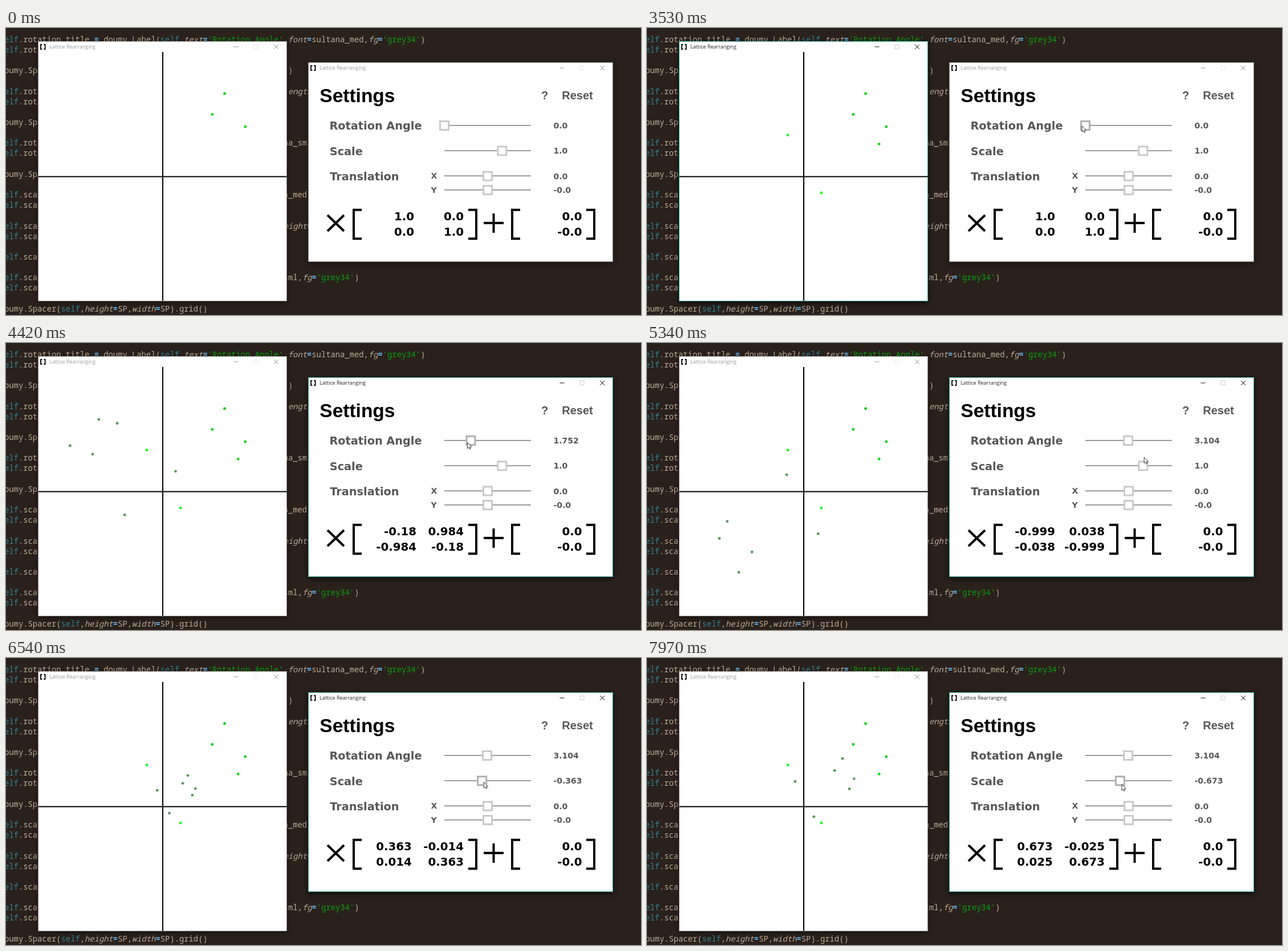
These frames come from a looping animation (1114x503 px, 8 s). An HTML page:

```html
<!DOCTYPE html>
<html lang="en">
<head>
<meta charset="utf-8">
<title>Lattice Rearranging</title>
<style>
  html, body { margin: 0; width: 100%; height: 100%; overflow: hidden; background: #2a211c; }
  svg { display: block; width: 100vw; height: 100vh; }
  text { white-space: pre; }
  .code { font: 13.83px "Noto Sans Mono", monospace; fill: #bdab98; }
  .self { fill: #2f8493; }
  .str { fill: #0a9f0c; }
  .arg { font-style: italic; }
  .op { fill: #5fb8f5; font-weight: bold; }
  .title { font: 9px "Open Sans", sans-serif; fill: #999; }
  .btn { stroke: #999; fill: none; }
  .max { stroke: #ececec; fill: none; }
  .frame { fill: #fff; stroke: #8d8985; stroke-width: .6; }
  .shade { fill: #000; opacity: .4; }
  .on .title { fill: #222; }
  .on .btn { stroke: #111; }
  .on .max { stroke: #ccc; }
  .on .frame { stroke: #2fa797; stroke-width: 1; }
  .on .shade { opacity: .65; }
  .grey { fill: #575757; }
  .head { font: bold 33.5px "Liberation Sans", Arial, sans-serif; }
  .link { font: bold 20px "Liberation Sans", Arial, sans-serif; }
  .label { font: bold 19.3px "DejaVu Sans", Verdana, sans-serif; }
  .small { font: bold 14px "DejaVu Sans", Verdana, sans-serif; }
  .cell { font: bold 19.8px "DejaVu Sans", Verdana, sans-serif; text-anchor: end; }
  .handle { fill: #fff; stroke: #cacaca; stroke-width: 3; }
  .handle.hot { stroke: #b0b0b0; }
</style>
</head>
<body>
<svg id="stage" viewBox="0 0 1114 503" preserveAspectRatio="none"></svg>
<script>
const LOOP = 8000;
const OX = 275, OY = 260.5;
const LEAD = 60; // ms by which dragged parts run ahead of the printed values
const $ = id => document.getElementById(id);

// ---------- editor behind the windows ----------
const ROT = 'elf.rotation', SCL = 'elf.scale_x', GAP = 'oumy.Spacer';
const CODE = [
  [0, 0, "elf.rotation_title = doumy.Label(self.text='Rotation Angle',font=sultana_med,fg='grey34')"],
  [1, 0, ROT], [3, 0, GAP], [3, 60, ')'],
  [5, 0, ROT], [5, 60, 'ength=1'], [6, 0, ROT], [8, 0, GAP],
  [10, 0, ROT], [10, 59, 'na_sml'], [11, 0, ROT], [13, 0, GAP],
  [15, 0, SCL], [15, 59, 'a_med,'], [16, 0, SCL],
  [18, 0, SCL], [18, 59, 'eight='], [19, 0, SCL], [21, 0, SCL],
  [23, 0, SCL], [23, 59, "sml,fg='grey34')"], [24, 0, SCL],
  [26, 0, 'oumy.Spacer(self,height=SP,width=SP).grid()']
];

function paint(line) {
  const rx = /('[^']*')|\b(s?elf)\b|(\w+(?==))|(=)|(\w+|[^\w'=]+)/g;
  return line.replace(rx, (m, str, self, arg, op) => {
    const cls = str ? 'str' : self ? 'self' : arg ? 'arg' : op ? 'op' : '';
    return cls ? `<tspan class="${cls}">${m}</tspan>` : m;
  });
}

const codeText = CODE.map(([row, col, s]) =>
  `<text class="code" x="${-3 + col * 8.3}" y="${24.8 + row * 18.15}">${paint(s)}</text>`).join('');

// ---------- windows ----------
function windowBox(id, x, y, w, h, body) {
  const r = x + w, m = y + 9.5;
  return `<g id="${id}">
    <rect class="shade" x="${x - 1}" y="${y + 2}" width="${w + 2}" height="${h + 2}" filter="url(#blur)"/>
    <rect class="frame" x="${x}" y="${y}" width="${w}" height="${h}"/>
    <path d="M${x + 6.8} ${m - 4}h-2.3v8h2.3M${x + 9.8} ${m - 4}h2.3v8h-2.3" fill="none" stroke="#000" stroke-width="1.8"/>
    <text class="title" x="${x + 19.5}" y="${m + 3.4}">Lattice Rearranging</text>
    <path class="btn" d="M${r - 93} ${m}h8M${r - 22.5} ${m - 4}l8 8m0 -8l-8 8"/>
    <rect class="max" x="${r - 57.5}" y="${m - 3.5}" width="7" height="7"/>
    ${body}</g>`;
}

const txt = (cls, x, y, s, id = '') => `<text class="${cls}" x="${x}" y="${y}" id="${id}">${s}</text>`;

const slider = (id, x, y) =>
  `<path d="M769 ${y - .3}H921" stroke="#7c7c7c" stroke-width="1.5"/>
   <rect class="handle" id="${id}" x="${x - 7.5}" y="${y - 7.5}" width="15" height="15"/>`;

const DOTS = [
  // x, y, time of appearance, colour
  [383.5, 115, 0, '#08cc0e'], [361.8, 151.4, 0, '#0acf10'], [419.8, 173, 0, '#0dd312'],
  [407.2, 203.4, 1180, '#12dc16'], [247, 187.6, 1920, '#20f422'], [306, 289, 2560, '#24fa26']
];
const dot = (id, x, y, fill) => `<circle id="${id}" cx="${x}" cy="${y}" r="2.4" fill="${fill}"/>`;

const graph = `<path d="M275 42V478M57 260.5H492.5" stroke="#000" stroke-width="2"/>` +
  DOTS.map((d, i) => dot('moved' + i, d[0], d[1], '#5a955c')).join('') +
  DOTS.map((d, i) => dot('fixed' + i, d[0], d[1], d[3])).join('');

const settings =
  txt('head', 550.3, 130, 'Settings') +
  txt('link grey', 939, 125, '?') + txt('link grey', 975.3, 125, 'Reset') +
  txt('label grey', 567.5, 178.4, 'Rotation Angle') +
  txt('label grey', 567.8, 222.5, 'Scale') +
  txt('label grey', 568.3, 266.8, 'Translation') +
  txt('small grey', 745.5, 264.4, 'X') + txt('small grey', 745.5, 288.8, 'Y') +
  slider('rotHandle', 769, 171) + slider('sclHandle', 870, 215.3) +
  slider('xHandle', 845, 259.5) + slider('yHandle', 845, 284) +
  txt('small grey', 960.5, 176.2, '0.0', 'rotValue') +
  txt('small grey', 960.5, 220.4, '1.0', 'sclValue') +
  txt('small grey', 960.5, 264.6, '0.0') + txt('small grey', 960.5, 288.8, '-0.0') +
  `<g fill="none" stroke="#000" stroke-width="4">
    <path d="M564 328l29 28m0 -28l-29 28M838 341.7h35M855.5 325v34"/>
    <path d="M624 318.8H610V369.2H624M902 318.8H888V369.2H902M811 318.8H825V369.2H811M1018 318.8H1032V369.2H1018"/>
  </g>` +
  ['m00', 'm01', 'm10', 'm11'].map((id, i) =>
    txt('cell', i % 2 ? 803 : 716, i < 2 ? 337.3 : 363.8, '', id)).join('') +
  txt('cell', 1010.5, 337.3, '0.0') + txt('cell', 1010.5, 363.8, '-0.0');

$('stage').innerHTML =
  `<defs><filter id="blur" x="-10%" y="-10%" width="120%" height="120%"><feGaussianBlur stdDeviation="5"/></filter></defs>
   <rect width="1114" height="503" fill="#2a211c"/>` + codeText +
  windowBox('graphWin', 56.5, 23.5, 436, 455, graph) +
  windowBox('setWin', 530.5, 60.5, 534, 349, settings) +
  `<path id="cursor" d="M0 0V10.4L2.4 8.2L4 11.8L5.7 11L4.2 7.6H7.4Z" stroke-width=".9"/>`;

// ---------- motion ----------
const ROT_KEYS = [[3710, 0], [3900, .25], [4420, 1.752], [4440, 1.752], [4500, 2], [4550, 2.03],
  [4800, 2.9], [4910, 3.104]];
const SCL_KEYS = [[5800, 1], [5940, .85], [6420, -.3], [6540, -.363], [6560, -.363], [6600, -.385],
  [6830, -.75], [7220, -1.38], [7370, -1.46], [7560, -1.46], [7660, -1.33], [7870, -.8],
  [7970, -.673], [7985, -.673], [8030, -.597]];
const PATH = [[280, 903, 474], [950, 408, 202], [1180, 408, 202], [1590, 247, 187.4], [1920, 247, 187.4],
  [2280, 306, 288], [2710, 306, 288], [3350, 762, 172.5], [3480, 762, 172.5], [3530, 763, 171.5], [3710, 763, 171.5],
  [4420, 810, 174.5], [4910, 838, 174.5], [5160, 838, 174.5], [5360, 873, 201], [5570, 873, 211],
  [5750, 873, 211], [6540, 838, 217.5], [7330, 811, 221], [7970, 832, 221.5]];

const linear = u => u;
const smooth = u => u * u * (3 - 2 * u);

function track(keys, t, k = 1, ease = linear) {
  if (t <= keys[0][0]) return keys[0][k];
  for (let i = 1; i < keys.length; i++) {
    const a = keys[i - 1], b = keys[i];
    if (t < b[0]) return a[k] + (b[k] - a[k]) * ease((t - a[0]) / (b[0] - a[0]));
  }
  return keys[keys.length - 1][k];
}

function num(v) {
  const r = Math.round(v * 1000) / 1000;
  return Number.isInteger(r) ? r.toFixed(1) : String(r);
}

const set = (id, attrs) => { for (const k in attrs) $(id).setAttribute(k, attrs[k]); };
const width = id => $(id).getComputedTextLength();

function drawMatrix(c, s) {
  const cells = { m00: c, m01: s, m10: -s, m11: c };
  for (const id in cells) $(id).textContent = num(cells[id]);
  const left = Math.max(width('m00'), width('m10'));
  const right = Math.max(width('m01'), width('m11'));
  const edge = 716 + (left - right) / 2;
  set('m00', { x: edge });
  set('m10', { x: edge });
}

function drawDots(t, c, s) {
  DOTS.forEach(([x, y, born], i) => {
    const dx = x - OX, dy = OY - y;
    set('fixed' + i, { visibility: t >= born ? 'visible' : 'hidden' });
    set('moved' + i, {
      cx: OX + dx * c - dy * s,
      cy: OY - dx * s - dy * c,
      visibility: t >= 3710 ? 'visible' : 'hidden'
    });
  });
}

function drawCursor(t, rotX, sclX) {
  let x = track(PATH, t, 1, smooth);
  const y = track(PATH, t, 2, smooth);
  if (t >= 3710 && t < 5160) x = rotX - 6;
  if (t >= 5750) x = sclX + 3;
  const inGraph = x > 57 && x < 492 && y > 23 && y < 478;
  const inSettings = x > 531 && x < 1064 && y > 61 && y < 409;
  set('cursor', {
    transform: `translate(${x} ${y})`,
    visibility: t >= 280 && (inGraph || inSettings) ? 'visible' : 'hidden',
    fill: inGraph ? '#000' : '#fff',
    stroke: inGraph ? '#fff' : '#222'
  });
}

function draw(t) {
  const rot = track(ROT_KEYS, t), scl = track(SCL_KEYS, t);
  const cos = Math.cos(rot), sin = Math.sin(rot);
  const dragRot = track(ROT_KEYS, t < 3710 ? t : t + LEAD);
  const dragScl = track(SCL_KEYS, t + LEAD);
  const rotX = 769 + 152 * dragRot / (2 * Math.PI);
  const sclX = 845 + dragScl * 76 / 3;

  set('graphWin', { class: t >= 1180 && t < 3710 ? 'on' : '' });
  set('setWin', { class: t >= 3710 ? 'on' : '' });
  set('rotHandle', { x: rotX - 7.5, class: t > 3300 && t < 5230 ? 'handle hot' : 'handle' });
  set('sclHandle', { x: sclX - 7.5, class: t > 5400 ? 'handle hot' : 'handle' });
  $('rotValue').textContent = num(rot);
  $('sclValue').textContent = num(scl);

  drawDots(t, dragScl * cos, dragScl * sin);
  drawMatrix(scl * cos, scl * sin);
  drawCursor(t, rotX, sclX);
}

const start = performance.now();
function tick() {
  draw((performance.now() - start) % LOOP);
  requestAnimationFrame(tick);
}
tick();
</script>
</body>
</html>
```
